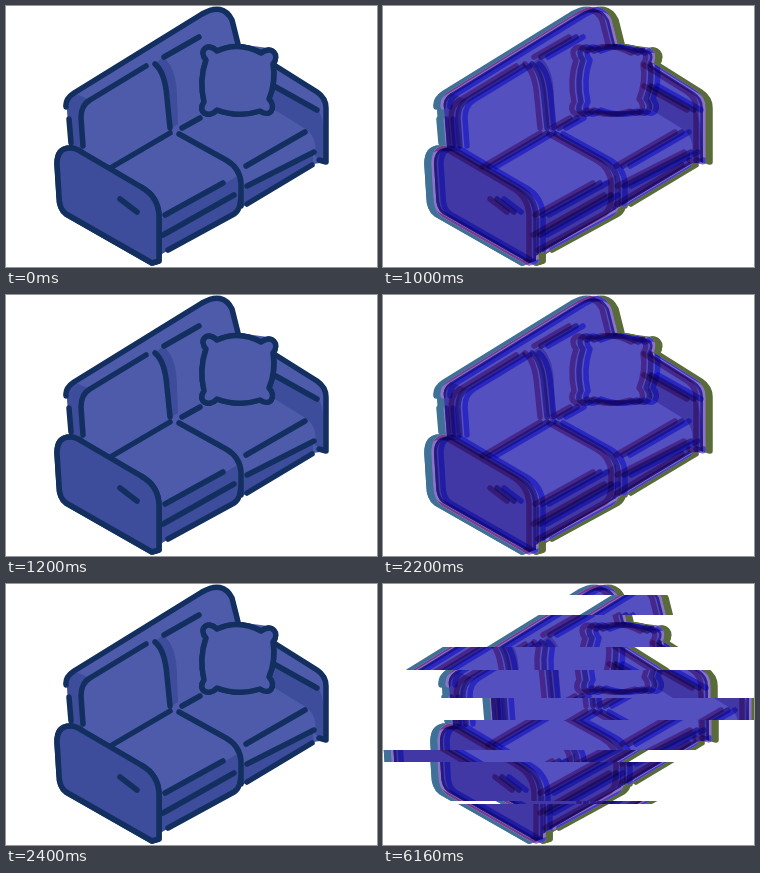
Animation of 371 by 261 pixels, one loop 8000 ms. Source, as an HTML page with a canvas:

```html
<!DOCTYPE html>
<html lang="en">
<head>
<meta charset="utf-8">
<title>Sofa glitch</title>
<style>
html, body { margin: 0; width: 100%; height: 100%; overflow: hidden; background: #fff; }
canvas { display: block; }
</style>
</head>
<body>
<canvas id="stage" width="371" height="261"></canvas>
<script>
const W = 371, H = 261, LOOP = 8000, SPLIT = 7;

const body = new Path2D(`M61 102 Q59 93 68 87 L196 8 Q217 -4 226 14 L232 38 L262 42 L270 60
  L311 86 Q320 92 320 102 V156 L308 158 L236 201 L154 249 L146 257 L60 208 Q53 203 53 190
  L51 158 Q51 142 64 142 Z`);
const pillow = new Path2D(`M200 54 C192 44 202 36 211 45 Q233 35 255 47 C266 39 274 49 267 58
  Q270 76 263 93 C271 102 264 112 254 105 Q232 112 211 104 C202 113 191 106 198 96 Q193 74 200 54 Z`);
const arm = new Path2D(`M51 158 Q51 142 64 142 Q70 142 77 147 L135 181 Q153 191 153 211 V255
  L146 257 L60 208 Q53 203 53 190 Z`);
const shade = new Path2D(`M61 102 Q59 93 68 87 L84 94 Q75 99 75 112 L78 143 L64 141 Z
  M149 58 L157 51 Q171 62 171 92 L172 118 L164 123 L161 92 Q159 66 149 58 Z
  M267 78 L311 103 Q319 108 320 157 L309 150 Q312 130 298 122 L264 101 Z
  M154 213 L218 178 L233 169 V203 L154 249 Z M236 182 L307 146 V158 L236 201 Z`);
const lines = new Path2D(`M60 101 Q59 93 68 87 L196 8 Q217 -4 226 14 L232 38
  M63 113 L65 137 M77 140 L75 112 Q75 99 84 94 L140 60
  M149 58 Q159 66 161 92 L164 122 M158 51 L193 31
  M268 59 L311 86 Q320 92 320 102 V156 L313 154 M268 80 L311 104
  M106 161 L164 127 M173 128 L220 154 Q234 162 235 177 V200 M176 122 L194 112
  M240 160 L299 126 M159 209 L217 177 M241 180 L308 146
  M157 229 L228 189 M162 244 L228 208 Q235 204 235 188 M241 198 L306 159`);
const handle = new Path2D("M114 193 L131 206");

const plain = { light: "#4e5bab", dark: "#3d4c9b", line: "#122f60" };
const tinted = { light: "#5450c0", dark: "#4138a5" };
const flat = c => ({ light: c, dark: c, line: c });

function layer() {
  const g = Object.assign(document.createElement("canvas"), { width: W, height: H }).getContext("2d");
  g.lineCap = g.lineJoin = "round";
  g.lineWidth = 5.5;
  return g;
}

function strokes(g, color, dx) {
  g.save();
  g.translate(dx, 0);
  g.strokeStyle = color;
  for (const p of [lines, arm, handle, pillow]) g.stroke(p);
  g.restore();
}

function sofa(g, { light, dark, line }, dx = 0) {
  const paint = (p, c) => {
    g.fillStyle = c;
    g.fill(p);
  };
  g.save();
  g.translate(dx, 0);
  paint(body, light);
  paint(shade, dark);
  if (line) strokes(g, line, 0);
  paint(arm, dark);
  paint(pillow, light);
  if (line) for (const p of [arm, handle, pillow]) { g.strokeStyle = line; g.stroke(p); }
  g.restore();
}

const clean = layer();
sofa(clean, plain);

// The three outlines darken each other, but only inside the middle copy.
const middle = layer();
sofa(middle, tinted);
middle.globalCompositeOperation = "multiply";
strokes(middle, "#d480ba", -SPLIT);
strokes(middle, "#8c73c7", 0);
strokes(middle, "#8080ff", SPLIT);
middle.globalCompositeOperation = "destination-in";
middle.drawImage(clean.canvas, 0, 0);

const split = layer();
sofa(split, flat("#3f7198"), -SPLIT);
sofa(split, flat("#596b39"), SPLIT);
split.drawImage(middle.canvas, 0, 0);

// Each slice: top edge, sideways shift.
const slices = [[0, 7], [11, 50], [31, 9], [63, -35], [86, 5], [114, 46], [136, 6],
  [166, -41], [178, 5], [217, 50], [220, 7], [H, 0]];
const torn = layer();
slices.slice(0, -1).forEach(([y, dx], i) => {
  const h = slices[i + 1][0] - y;
  torn.drawImage(split.canvas, 0, y, W, h, dx, y, W, h);
});

const cues = [[3400, torn], [2400, clean], [2200, split], [1200, clean], [1000, split], [0, clean]];
const stage = document.getElementById("stage").getContext("2d");
const start = performance.now();

function frame() {
  const t = (performance.now() - start) % LOOP;
  stage.clearRect(0, 0, W, H);
  stage.drawImage(cues.find(([at]) => t >= at)[1].canvas, 0, 0);
  requestAnimationFrame(frame);
}
frame();
</script>
</body>
</html>
```
